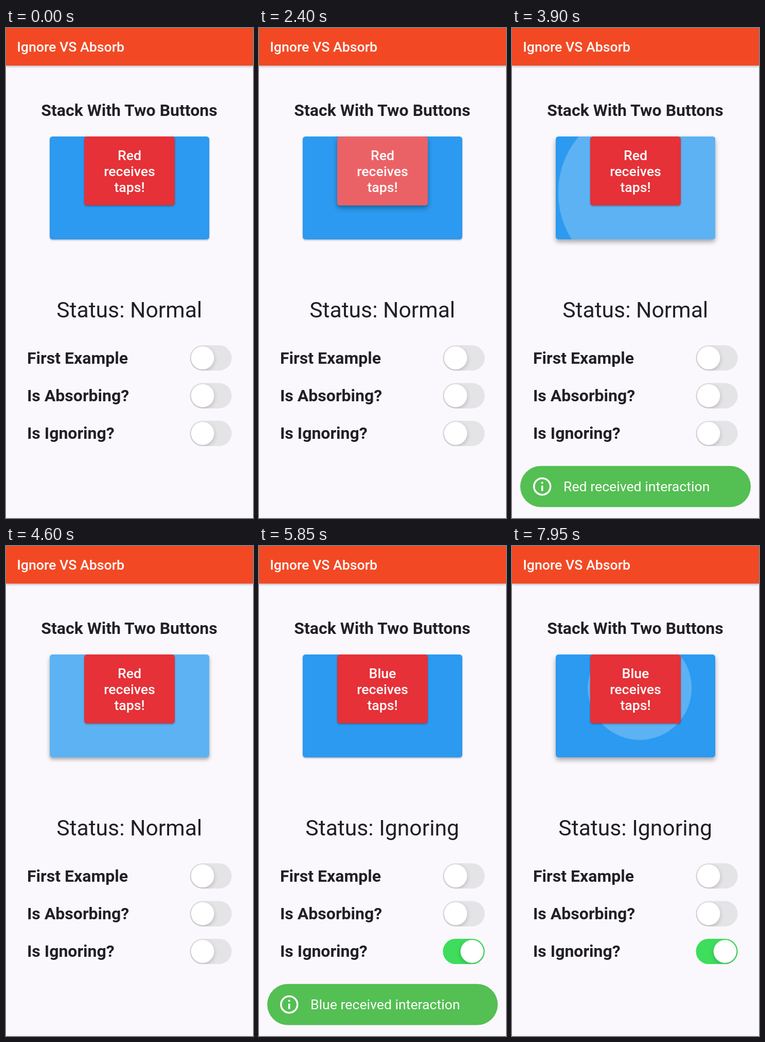
Write an HTML page that moves like this. It is 480x953 px and loops after 8000 ms.

```html
<!DOCTYPE html>
<html lang="en">
<head>
<meta charset="utf-8">
<title>Ignore VS Absorb</title>
<style>
  html, body { margin: 0; width: 100%; height: 100%; overflow: hidden; background: #faf8fd; }
  .stage { position: relative; width: 480px; height: 953px; overflow: hidden; background: #faf8fd; }
  .stage > * { position: absolute; }

  .bar { left: 0; top: 0; width: 480px; height: 73px; background: #f24924;
         box-shadow: 0 2px 4px rgba(0, 0, 0, .28); }

  /* Buttons: --x/--y place the box, the ripple is clipped inside it */
  .btn { top: 211px; border-radius: 5.3px; }
  .clip { position: absolute; inset: 0; overflow: hidden; border-radius: inherit; }
  .blue { left: 85px; width: 310px; height: 200px; background: #2b9af0; }
  .red { left: 152px; width: 176px; height: 134px; background: #e53137; }
  .ripple { position: absolute; left: 50%; top: 50%; width: calc(2 * var(--r)); height: calc(2 * var(--r));
            margin: calc(-1 * var(--r)) 0 0 calc(-1 * var(--r)); border-radius: 50%;
            background: rgba(255, 255, 255, .24); opacity: 0; }
  .blue .ripple { --r: 190.7px; }
  .red .ripple { --r: 117.3px; }

  svg { left: 0; top: 0; }
  text { font-family: Roboto, Arial, sans-serif; fill: #202025; }
  .mid { text-anchor: middle; }
  .h { font-size: 32px; font-weight: 700; }
  .status { font-size: 42.67px; }
  .cap { font-size: 26.67px; font-weight: 500; }
  .snack text { font-size: 26.67px; }
  .cap, .snack text { fill: #fff; }
  .track { fill: #e4e3e6; }
  .thumb { fill: #fff; filter: drop-shadow(0 3px 4px rgba(0, 0, 0, .2)); }

  /* Everything shares one 8 s clock; 1% = 80 ms */
  .red, .blue, .ripple, .snack, .before, .after, .thumb.on, .track.on {
    animation: 8s linear infinite; }

  .red { animation-name: lift-red; }
  @keyframes lift-red {
    0%, 9.625%, 33.125%, 100% { box-shadow: 0 1.5px 3px rgba(0, 0, 0, .32); }
    12.125%, 30.625% { box-shadow: 0 5px 10px rgba(0, 0, 0, .34); }
  }
  .blue { animation-name: lift-blue; }
  @keyframes lift-blue {
    0%, 41.8125%, 59.275%, 96.65% { box-shadow: 0 1.5px 3px rgba(0, 0, 0, .32); }
    44.3125%, 56.775%, 99.15%, 100% { box-shadow: 0 5px 10px rgba(0, 0, 0, .34); }
  }

  .tap1 { animation-name: grow1, fade1 !important; }
  @keyframes grow1 {
    0%, 9.625% { transform: translate(10px, 22px) scale(.283); animation-timing-function: ease; }
    22.125%, 100% { transform: translate(0, 0) scale(1); }
  }
  @keyframes fade1 {
    0%, 9.625%, 35.3125%, 100% { opacity: 0; }
    10.5625%, 33.4375% { opacity: 1; }
  }
  .tap2 { animation-name: grow2, fade2 !important; }
  @keyframes grow2 {
    0%, 41.8125% { transform: translate(140px, 67px) scale(.2895); animation-timing-function: ease; }
    54.3125%, 100% { transform: translate(0, 0) scale(1); }
  }
  @keyframes fade2 {
    0%, 41.8125%, 61.4625%, 100% { opacity: 0; }
    42.75%, 59.5875% { opacity: 1; }
  }
  /* The last press is cut by the loop, so its easing is the first part of "ease" */
  .tap3 { animation-name: grow3, fade3 !important; }
  @keyframes grow3 {
    0%, 96.65% { transform: translate(13px, -52px) scale(.2895);
                 animation-timing-function: cubic-bezier(.408, .098, .637, .537); }
    100% { transform: translate(7.2px, -28.7px) scale(.6075); }
  }
  @keyframes fade3 {
    0%, 96.65% { opacity: 0; }
    97.5875%, 100% { opacity: 1; }
  }

  .snack { opacity: 0; }
  .first { animation-name: snack1; }
  @keyframes snack1 {
    0%, 31.875% { opacity: 0; }
    33.75%, 56.775% { opacity: 1; }
    56.776%, 100% { opacity: 0; }
  }
  .second { animation-name: snack2; }
  @keyframes snack2 {
    0%, 58.025%, 99.25%, 100% { opacity: 0; }
    59.9%, 97.375% { opacity: 1; }
  }

  /* Ignoring is switched on at 5.5 s */
  .before { animation-name: leave; }
  .after { animation-name: enter; }
  @keyframes leave { 0%, 68.74% { opacity: 1; } 68.75%, 100% { opacity: 0; } }
  @keyframes enter { 0%, 68.74% { opacity: 0; } 68.75%, 100% { opacity: 1; } }
  .thumb.on { animation-name: slide; }
  @keyframes slide {
    0%, 68.5% { transform: translateX(0); animation-timing-function: ease; }
    71%, 100% { transform: translateX(32px); }
  }
  .track.on { animation-name: tint; }
  @keyframes tint {
    0%, 68.5% { fill: #e4e3e6; animation-timing-function: ease; }
    71%, 100% { fill: #3edd5c; }
  }
</style>
</head>
<body>
<div class="stage">
  <div class="bar"></div>
  <div class="btn blue"><div class="clip"><div class="ripple tap2"></div><div class="ripple tap3"></div></div></div>
  <div class="btn red"><div class="clip"><div class="ripple tap1"></div></div></div>

  <svg width="480" height="953" viewBox="0 0 480 953">
    <defs>
      <clipPath id="pill"><rect x="357.2" y="-24.8" width="81.6" height="49.6" rx="24.8"/></clipPath>
      <g id="panel">
        <rect x="16" y="851.7" width="448" height="80" rx="40" fill="#54bf53"/>
        <g transform="translate(58.7 891.7)" fill="#fff">
          <circle r="16" fill="none" stroke="#fff" stroke-width="3.56"/>
          <path d="M-1.78-8.9h3.56v3.56h-3.56zM-1.78-1.78h3.56V8.9h-3.56z"/>
        </g>
      </g>
    </defs>

    <text class="cap" x="21.3" y="46">Ignore VS Absorb</text>
    <text class="h mid" x="239.5" y="171.3">Stack With Two Buttons</text>

    <g class="cap mid">
      <text class="cap before" x="240" y="256.7">Red</text>
      <text class="cap after" x="240" y="256.7">Blue</text>
      <text class="cap" x="240" y="287.7">receives</text>
      <text class="cap" x="240" y="318.7">taps!</text>
    </g>

    <text class="status mid before" x="239.7" y="563">Status: Normal</text>
    <text class="status mid after" x="239.7" y="563">Status: Ignoring</text>

    <text class="h" x="41" y="652.5">First Example</text>
    <text class="h" x="41" y="725.8">Is Absorbing?</text>
    <text class="h" x="41" y="799.3">Is Ignoring?</text>

    <g transform="translate(0 641.7)" clip-path="url(#pill)">
      <rect class="track" x="357.2" y="-24.8" width="81.6" height="49.6" rx="24.8"/>
      <circle class="thumb" cx="382" r="22.4"/>
    </g>
    <g transform="translate(0 715.1)" clip-path="url(#pill)">
      <rect class="track" x="357.2" y="-24.8" width="81.6" height="49.6" rx="24.8"/>
      <circle class="thumb" cx="382" r="22.4"/>
    </g>
    <g transform="translate(0 788.5)" clip-path="url(#pill)">
      <rect class="track on" x="357.2" y="-24.8" width="81.6" height="49.6" rx="24.8"/>
      <circle class="thumb on" cx="382" r="22.4"/>
    </g>

    <g class="snack first"><use href="#panel"/><text x="100" y="900.8">Red received interaction</text></g>
    <g class="snack second"><use href="#panel"/><text x="100" y="900.8">Blue received interaction</text></g>
  </svg>
</div>
</body>
</html>
```
